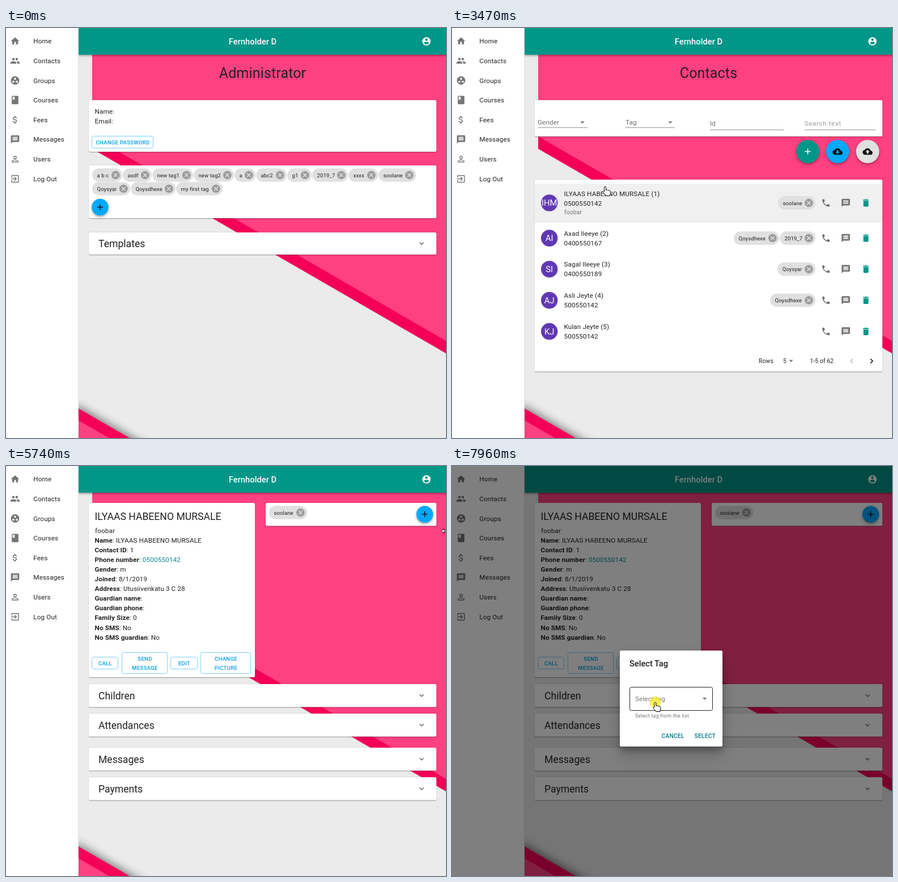
These frames come from a looping animation (776x722 px, 8 s). An HTML page:

```html
<!DOCTYPE html>
<html lang="en">
<head>
<meta charset="utf-8">
<title>Admin panel</title>
<style>
  html, body { margin: 0; width: 100%; height: 100%; overflow: hidden; background: #ebebeb; }
  svg { display: block; font-family: Roboto, Arial, sans-serif; }
  .card { fill: #fff; filter: drop-shadow(0 1px .5px rgba(0,0,0,.3)) drop-shadow(0 .7px 1px rgba(0,0,0,.14)); }
  .fab { filter: drop-shadow(0 2px 1.6px rgba(0,0,0,.24)) drop-shadow(0 2px 3.5px rgba(0,0,0,.16)); }
  .bar { filter: drop-shadow(0 2px 1.6px rgba(0,0,0,.26)) drop-shadow(0 .7px 3px rgba(0,0,0,.14)); }
  .wedge { filter: drop-shadow(4px -2px 7.5px rgba(0,0,0,.48)); }
  .panel { filter: drop-shadow(0 8px 5px rgba(0,0,0,.2)) drop-shadow(0 13px 13px rgba(0,0,0,.2)); }
</style>
</head>
<body>
<svg id="stage" width="776" height="722" viewBox="0 0 776 722"></svg>
<script>
const LOOP = 8000;
const TEAL = '#009688', BLUE = '#00a9fc', GREY = '#757575', INK = '#212121';
const CLOUD = 'M19.35 10.04C18.67 6.59 15.64 4 12 4 9.11 4 6.6 5.64 5.35 8.04 2.34 8.36 0 10.91 0 14c0 3.31 2.69 6 6 6h13c2.76 0 5-2.24 5-5 0-2.64-2.05-4.78-4.65-4.96z';
const ICONS = {
  home: 'M10 20v-6h4v6h5v-8h3L12 3 2 12h3v8z',
  people: 'M16 11c1.66 0 2.99-1.34 2.99-3S17.66 5 16 5c-1.66 0-3 1.34-3 3s1.34 3 3 3zm-8 0c1.66 0 2.99-1.34 2.99-3S9.66 5 8 5C6.34 5 5 6.34 5 8s1.34 3 3 3zm0 2c-2.33 0-7 1.17-7 3.5V19h14v-2.5c0-2.33-4.67-3.5-7-3.5zm8 0c-.29 0-.62.02-.97.05 1.16.84 1.97 1.97 1.97 3.45V19h6v-2.5c0-2.33-4.67-3.5-7-3.5z',
  work: 'M12 2a10 10 0 1 0 .01 0zM8 12.5a2.5 2.5 0 1 0 .01 0zM12 5.5a2.5 2.5 0 1 0 .01 0zM16 12.5a2.5 2.5 0 1 0 .01 0z',
  book: 'M18 2H6c-1.1 0-2 .9-2 2v16c0 1.1.9 2 2 2h12c1.1 0 2-.9 2-2V4c0-1.1-.9-2-2-2zM6 4h5v8l-2.5-1.5L6 12V4z',
  money: 'M11.8 10.9c-2.27-.59-3-1.2-3-2.15 0-1.09 1.01-1.85 2.7-1.85 1.78 0 2.44.85 2.5 2.1h2.21c-.07-1.72-1.12-3.3-3.21-3.81V3h-3v2.16c-1.94.42-3.5 1.68-3.5 3.61 0 2.31 1.91 3.46 4.7 4.13 2.5.6 3 1.48 3 2.41 0 .69-.49 1.79-2.7 1.79-2.06 0-2.87-.92-2.98-2.1h-2.2c.12 2.19 1.76 3.42 3.68 3.83V21h3v-2.15c1.95-.37 3.5-1.5 3.5-3.55 0-2.84-2.43-3.81-4.7-4.4z',
  message: 'M20 2H4c-1.1 0-2 .9-2 2v18l4-4h14c1.1 0 2-.9 2-2V4c0-1.1-.9-2-2-2zm-2 12H6v-2h12v2zm0-3H6V9h12v2zm0-3H6V6h12v2z',
  person: 'M12 5.9a2.1 2.1 0 1 1 0 4.2a2.1 2.1 0 1 1 0-4.2m0 9c2.97 0 6.1 1.46 6.1 2.1v1.1H5.9V17c0-.64 3.13-2.1 6.1-2.1M12 4a4 4 0 1 0 0 8a4 4 0 1 0 0-8zm0 9c-2.67 0-8 1.34-8 4v3h16v-3c0-2.66-5.33-4-8-4z',
  exit: 'M10.09 15.59L11.5 17l5-5-5-5-1.41 1.41L12.67 11H3v2h9.67zM19 3H5c-1.11 0-2 .9-2 2v4h2V5h14v14H5v-4H3v4c0 1.1.89 2 2 2h14c1.1 0 2-.9 2-2V5c0-1.1-.9-2-2-2z',
  account: 'M12 2a10 10 0 1 0 .01 0zM12 5a3 3 0 1 1 0 6a3 3 0 1 1 0-6zm0 14.2c-2.5 0-4.71-1.28-6-3.22.03-1.99 4-3.08 6-3.08 1.99 0 5.97 1.09 6 3.08-1.29 1.94-3.5 3.22-6 3.22z',
  cancel: 'M12 2a10 10 0 1 0 .01 0zM17 15.59L15.59 17 12 13.41 8.41 17 7 15.59 10.59 12 7 8.41 8.41 7 12 10.59 15.59 7 17 8.41 13.41 12z',
  phone: 'M6.62 10.79c1.44 2.83 3.76 5.14 6.59 6.59l2.2-2.2c.27-.27.67-.36 1.02-.24 1.12.37 2.33.57 3.57.57.55 0 1 .45 1 1V20c0 .55-.45 1-1 1-9.39 0-17-7.61-17-17 0-.55.45-1 1-1h3.5c.55 0 1 .45 1 1 0 1.25.2 2.45.57 3.57.11.35.03.74-.25 1.02z',
  trash: 'M6 19c0 1.1.9 2 2 2h8c1.1 0 2-.9 2-2V7H6zM19 4h-3.5l-1-1h-5l-1 1H5v2h14z',
  upload: CLOUD + 'M14 13v4h-4v-4H7l5-5 5 5z',
  download: CLOUD + 'M17 13l-5 5-5-5h3V9h4v4z',
  add: 'M19 13h-6v6h-2v-6H5v-2h6V5h2v6h6z',
  expand: 'M16.59 8.59L12 13.17 7.41 8.59 6 10l6 6 6-6z',
  prev: 'M15.41 7.41L14 6l-6 6 6 6 1.41-1.41L10.83 12z',
  next: 'M10 6L8.59 7.41 13.17 12l-4.58 4.59L10 18l6-6z',
  drop: 'M7 10l5 5 5-5z'
};

const text = (x, y, s, size = 11.73, { fill = INK, ls = .11, weight = 400, anchor = 'start' } = {}) =>
  `<text x="${x}" y="${y}" font-size="${size}" fill="${fill}" letter-spacing="${ls}" font-weight="${weight}" text-anchor="${anchor}">${s}</text>`;
const icon = (name, x, y, fill = GREY, size = 17.6) =>
  `<path transform="translate(${x - size / 2} ${y - size / 2}) scale(${size / 24})" fill="${fill}" fill-rule="evenodd" d="${ICONS[name]}"/>`;
const rect = (x, y, w, h, attrs) => `<rect x="${x}" y="${y}" width="${w}" height="${h}" ${attrs}/>`;
const card = (x, top, right, bottom) => rect(x, top, right - x, bottom - top, 'rx="2.5" class="card"');
const line = (x1, x2, y, color = '#949494') => `<path d="M${x1} ${y}H${x2}" stroke="${color}"/>`;
const fab = (x, y, r, fill, name, ink = '#111') =>
  `<circle class="fab" cx="${x}" cy="${y}" r="${r}" fill="${fill}"/>` + icon(name, x, y, ink);
const chip = (x, right, y, s) =>
  rect(x, y - 11.8, right - x, 23.6, 'rx="11.8" fill="#e0e0e0"') +
  text(x + 8.5, y + 3.5, s, 9.53, { ls: .09 }) + icon('cancel', right - 11.7, y, '#9c9c9c');
const chips = (x, y, list) => list.map(([s, right]) => {
  const out = chip(x, right, y, s);
  x = right + 1;
  return out;
}).join('');
const button = (x, right, y, ...lines) => {
  const half = lines.length > 1 ? 18.5 : 10.5;
  return rect(x - .5, y - half - .5, right - x, half * 2, 'rx="3" fill="none" stroke="#7fd0f7"') +
    lines.map((s, i) => text((x + right) / 2, y + 3.5 + (i - (lines.length - 1) / 2) * 16, s, 9.53,
      { fill: '#03a0ea', weight: 500, ls: .3, anchor: 'middle' })).join('');
};
const heading = s => text(452.5, 88, s, 24.93, { ls: .18, anchor: 'middle' });
const accordion = (top, bottom, s) => {
  const mid = (top + bottom) / 2;
  return card(146, top, 759, bottom) + text(163, mid + 6.4, s, 17.6, { ls: 0 }) + icon('expand', 733, mid, '#555', 15.5);
};

const PHONE = '0500550142', FULL = 'ILYAAS HABEENO MURSALE';
const nav = [['home', 'Home'], ['people', 'Contacts'], ['work', 'Groups'], ['book', 'Courses'],
  ['money', 'Fees'], ['message', 'Messages'], ['person', 'Users'], ['exit', 'Log Out']];
const PITCH = 34.65;

const backdrop = rect(0, 0, 776, 722, 'fill="#ebebeb"') +
  '<path fill="#f50057" d="M152 47H776V573L152 212.7z"/><path fill="#ff4081" d="M152 47H776V551L152 190.7z"/>' +
  '<g class="wedge"><path fill="#f50057" d="M118 664.2L250 740.4H118z"/></g>' +
  '<path fill="#ff4081" d="M118 685.2L214 740.6H118z"/>';

const appBar = rect(128, -10, 660, 57, `fill="${TEAL}" class="bar"`) +
  text(435, 28.5, 'Fernholder D', 14.67, { fill: '#fff', weight: 500, ls: .05, anchor: 'middle' }) +
  icon('account', 741.5, 23.5, '#fff');

const drawer = rect(0, 0, 128, 722, 'fill="#fff"') + '<path d="M127.5 0V722" stroke="#e2e2e2"/>' +
  rect(0, 0, 127, PITCH, 'id="navHover"') +
  nav.map(([name, s], i) => icon(name, 16, 23 + PITCH * i) + text(48.3, 27.2 + PITCH * i, s)).join('');

const adminPage = heading('Administrator') +
  card(146, 127, 759, 218) + text(156.5, 151, 'Name:') + text(156.5, 168, 'Email:') +
  button(152, 260, 201.5, 'CHANGE PASSWORD') +
  card(146, 242, 759, 335) +
  chips(152, 259, [['a b c', 205], ['asdf', 257], ['new tag1', 330], ['new tag2', 402], ['a', 440],
    ['abc2', 495], ['g1', 539], ['2019_7', 603], ['xxxx', 656], ['soolane', 723]]) +
  chips(152, 283, [['Qoysyar', 219], ['Qoysdhexe', 299], ['my first tag', 382]]) +
  fab(166, 315.5, 14.7, BLUE, 'add') + accordion(360, 399, 'Templates');

const people = [
  { y: 308, tag: 'IHM', name: FULL, phone: PHONE, chips: [575, ['soolane', 641]] },
  { y: 370, tag: 'AI', name: 'Axad Ileeye', phone: '0400550167', chips: [497, ['Qoysdhexe', 577], ['2019_7', 641]] },
  { y: 424.7, tag: 'SI', name: 'Sagal Ileeye', phone: '0400550189', chips: [574, ['Qoysyar', 641]] },
  { y: 479.5, tag: 'AJ', name: 'Asli Jeyte', phone: '500550142', chips: [561, ['Qoysdhexe', 641]] },
  { y: 534.3, tag: 'KJ', name: 'Kulan Jeyte', phone: '500550142', chips: [641] }
];
const person = (p, i) => {
  const base = i ? p.y - 4.5 : p.y - 11.8;
  return `<circle cx="171.7" cy="${p.y}" r="14.7" fill="#6038b3"/>` +
    text(171.7, p.y + 5.2, p.tag, 14.67, { fill: '#fff', ls: 0, anchor: 'middle' }) +
    text(197.5, base, `${p.name} (${i + 1})`) + text(197.5, base + 17.2, p.phone) +
    (i ? '' : text(198, 328, 'foobar', 10.27, { fill: GREY, ls: .18 })) +
    icon('phone', 659.5, p.y) + icon('message', 694.5, p.y) + icon('trash', 730, p.y, TEAL);
};
const soft = { fill: '#6f6f6f' };
const contactsPage = heading('Contacts') + card(146, 127, 759, 191) +
  text(151, 169.5, 'Gender', 11.73, soft) + line(152, 239, 175.5) + icon('drop', 230, 166) +
  text(306, 169.5, 'Tag', 11.73, soft) + line(306, 393, 175.5) + icon('drop', 385, 166) +
  text(455, 172, 'Id', 11.73, soft) + line(455, 585, 179.5) +
  text(621.5, 172, 'Search text', 11.73, { fill: '#9b9b9b', ls: .6 }) + line(622, 747, 179.5) +
  fab(627.5, 217.5, 20.5, TEAL, 'add', '#fff') + fab(680, 217.5, 20.5, BLUE, 'download') + fab(733, 217.5, 20.5, '#e0e0e0', 'upload') +
  card(146, 267, 759, 605) + rect(146, 274, 613, 69, 'id="rowHover"') +
  people.map(person).join('') +
  '<circle id="ripple" cx="265" cy="287" fill-opacity=".24" clip-path="url(#firstRow)"/>' +
  people.map(p => chips(p.chips[0], p.y, p.chips.slice(1))).join('') +
  text(541, 590, 'Rows', 10.27, { ls: .17 }) + text(584, 590, '5', 10.27) + icon('drop', 598, 586) +
  text(631.5, 590, '1-5 of 62', 10.27) + icon('prev', 705, 586.5, '#bdbdbd') + icon('next', 740, 586.5, '#111');

const fields = [['Name', FULL], ['Contact ID', '1'], ['Phone number', `<tspan fill="#0b8490">${PHONE}</tspan>`],
  ['Gender', 'm'], ['Joined', '8/1/2019'], ['Address', 'Utusiivenkatu 3 C 28'], ['Guardian name', ''],
  ['Guardian phone', ''], ['Family Size', '0'], ['No SMS', 'No'], ['No SMS guardian', 'No']];
const detailPage = card(146, 65, 439, 372) + text(156.5, 94.5, FULL, 17.6, { ls: 0 }) + text(157, 117.5, 'foobar') +
  fields.map(([k, v], i) => text(156.5, 134.6 + 17.1 * i, `<tspan font-weight="700">${k}</tspan>: ${v}`)).join('') +
  button(152, 198, 347.5, 'CALL') + button(205, 285, 347.5, 'SEND', 'MESSAGE') +
  button(291, 338, 347.5, 'EDIT') + button(344, 432, 347.5, 'CHANGE', 'PICTURE') +
  card(458, 65, 759, 105.5) + chip(464, 531, 82, 'soolane') + fab(738.5, 85, 14.7, BLUE, 'add') +
  '<circle id="fabHover" cx="738.5" cy="85" r="14.7"/>' +
  accordion(384, 424.5, 'Children') + accordion(436, 476.5, 'Attendances') +
  accordion(496, 536.5, 'Messages') + accordion(548, 588.5, 'Payments');

const action = { fill: '#007a80', weight: 500, ls: .2 };
const dialog = rect(296, 325, 181, 169, 'rx="2.5" fill="#fff" class="panel"') +
  text(313, 353, 'Select Tag', 14.67, { weight: 500, ls: 0 }) +
  rect(313.5, 389.5, 146, 41, 'id="outline" rx="3" fill="none"') +
  text(323, 413.5, 'Select tag', 11.73, { fill: '#777' }) + icon('drop', 445.5, 409.5) +
  text(323, 442.5, 'Select tag from the list', 8.8, { fill: GREY, ls: .29 }) +
  text(369.5, 479.3, 'CANCEL', 10.27, action) + text(427.5, 479.3, 'SELECT', 10.27, action);

const shapes = {
  arrow: 'M0 0V14.5L3.4 11.3 5.6 16.4 8 15.4 5.8 10.4H10.4z',
  hand: 'M-1.5 9V1.5a1.5 1.5 0 0 1 3 0V6.5c0-1 2.6-1 2.8.6.3-1 2.6-.8 2.7.7.4-.9 2.4-.6 2.4 1V12c0 1.5-1.2 3-1.2 4.5H1c-.5-2-3.5-4.5-4.6-6.2-.8-1.5.9-2.4 2.1-1.3z',
  resize: 'M-4 0L0-4V-1.3H6V1.3H0V4z'
};
const group = (id, body) => `<g id="${id}">${body}</g>`;

document.getElementById('stage').innerHTML =
  `<defs><clipPath id="firstRow">${rect(146, 274, 613, 69, '')}</clipPath></defs>` + backdrop +
  group('admin', adminPage) + group('contacts', contactsPage) + group('detail', detailPage) +
  appBar + drawer + rect(0, 0, 776, 722, 'id="scrim"') + group('dialog', dialog) +
  group('cursor', '<circle id="glow" r="10" fill="#f8ec2c" fill-opacity=".8"/><path id="pointer" fill="#fff" stroke="#000" stroke-linejoin="round"/>');

const el = id => document.getElementById(id);
const show = (id, on) => el(id).style.display = on ? '' : 'none';
const set = (id, attrs) => Object.entries(attrs).forEach(([k, v]) => el(id).setAttribute(k, v));
const within = (t, a, b) => t >= a && t < b;

// start, end, steps, target x, target y
const moves = [
  [660, 890, 4, 210, 424], [1040, 1680, 9, 88.5, 53.5], [2850, 3470, 9, 270, 279], [3540, 3620, 2, 268, 309],
  [3720, 4020, 5, 270, 366], [4095, 4320, 4, 265, 286], [5480, 5740, 4, 772, 114.5], [5880, 5960, 2, 756, 94],
  [6110, 6360, 4, 733, 88], [6900, 7440, 8, 352, 443], [7510, 7885, 6, 358.5, 416]
];
function cursorAt(t) {
  let x = 390, y = 741;
  for (const [start, end, n, tx, ty] of moves) {
    if (t < start) break;
    const step = Math.floor((t - start) / ((end - start) / (n - 1)) + 1e-6);
    const p = Math.min(1, (step + 1) / n);
    x += (tx - x) * p;
    y += (ty - y) * p;
  }
  return [x, y];
}
const fadeSteps = [[6747, 0], [6820, .18], [6900, .62], [6980, .92], [7055, 1]];
const fadeAt = t => fadeSteps.reduce((v, [at, f]) => t >= at ? f : v, 0);
const clicks = [[1910, 2070], [4470, 4630], [6670, 6747], [7885, 8000]];
const rowTops = [274, 343, 397.5, 452, 506.5, 561];

function draw(t) {
  const [x, y] = cursorAt(t);
  const onContacts = within(t, 2150, 4950);
  show('admin', t < 2150);
  show('contacts', onContacts);
  show('detail', t >= 5480);

  const onNav = t >= 660 && x < 128;
  show('navHover', onNav);
  set('navHover', { y: 5.7 + PITCH * Math.floor((y - 5.7) / PITCH), 'fill-opacity': within(t, 1910, 2850) ? .075 : .04 });

  const row = rowTops.findIndex((top, i) => y >= top && y < rowTops[i + 1]);
  const onRow = onContacts && x > 146 && row >= 0;
  show('rowHover', onRow);
  if (onRow) set('rowHover', { y: rowTops[row], height: rowTops[row + 1] - rowTops[row], 'fill-opacity': t < 4470 ? .057 : .08 });
  set('ripple', { r: Math.max(0, Math.floor((t - 4550) / 80 + 1e-6)) * 103.25 });

  show('fabHover', within(t, 6360, 6900));
  set('fabHover', { 'fill-opacity': t < 6670 ? .08 : .17 });
  const fade = fadeAt(t);
  set('scrim', { 'fill-opacity': fade * .5 });
  set('dialog', { opacity: fade });
  const onSelect = t >= 7510 && y < 431;
  set('outline', { stroke: onSelect ? '#222' : '#c2c2c2' });

  const hand = onNav || (onRow && t < 4710) || within(t, 6360, 6747) || onSelect;
  show('cursor', t >= 660);
  show('glow', clicks.some(([a, b]) => within(t, a, b)));
  set('cursor', { transform: `translate(${x} ${y})` });
  set('pointer', { d: shapes[within(t, 5740, 5880) ? 'resize' : hand ? 'hand' : 'arrow'] });
}

const begin = performance.now();
function tick() {
  draw((performance.now() - begin) % LOOP);
  requestAnimationFrame(tick);
}
tick();
</script>
</body>
</html>
```
